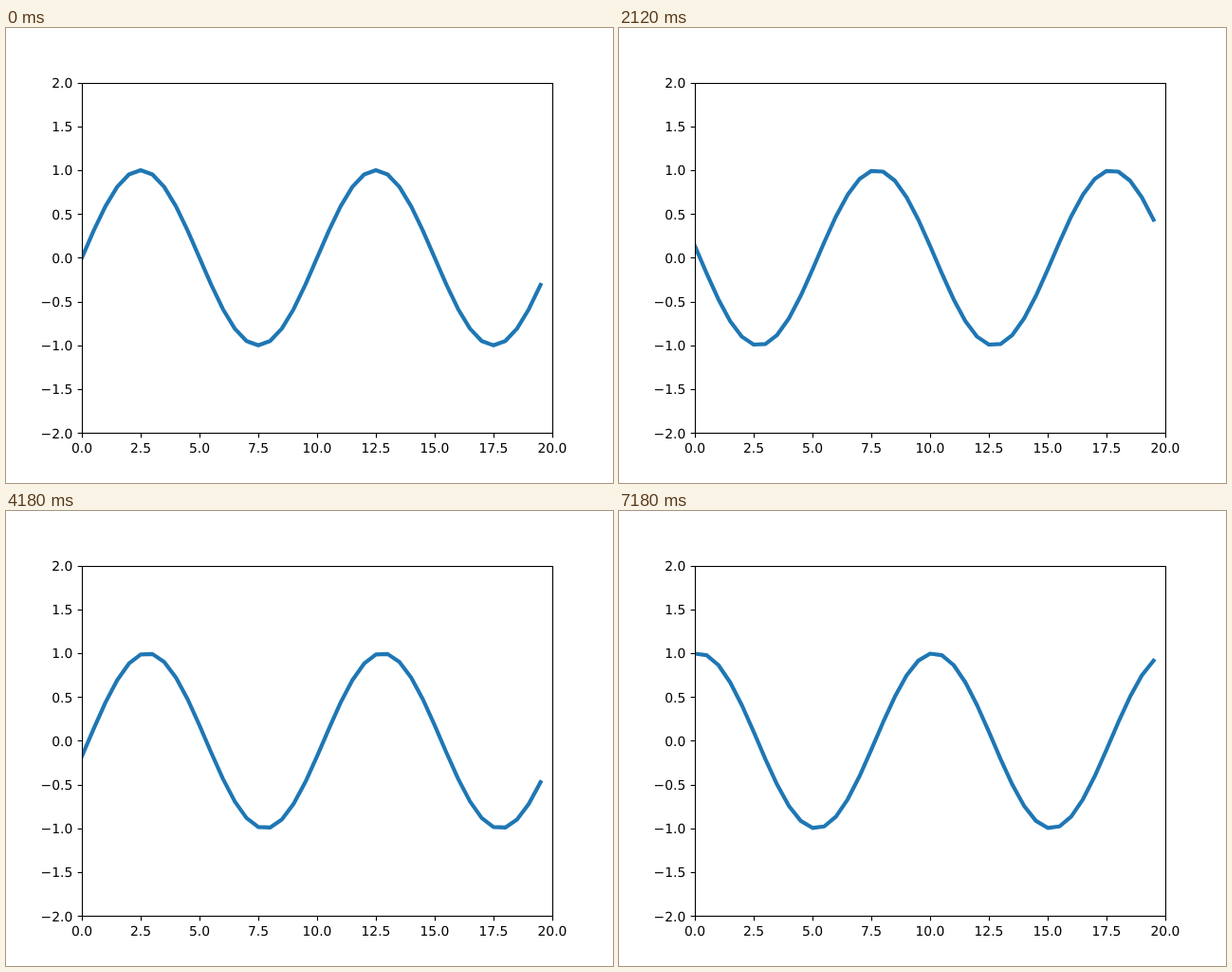
Animation of 640x480 px, one loop 7200 ms. Source, as an HTML page:

```html
<!DOCTYPE html>
<html lang="en">
<head>
<meta charset="utf-8">
<title>Travelling sine wave</title>
<style>
  html, body { margin: 0; width: 100%; height: 100%; overflow: hidden; background: #fff; }
  svg { display: block; }
  text { font: 13.889px "DejaVu Sans", sans-serif; fill: #000; text-rendering: geometricPrecision; }
  .axis { fill: none; stroke: #000; stroke-width: 1.111; }
  #wave { fill: none; stroke: #1f77b4; stroke-width: 4.167; stroke-linejoin: round; stroke-linecap: square; }
</style>
</head>
<body>
<svg width="640" height="480" viewBox="0 0 640 480">
  <clipPath id="plot"><rect x="80" y="57.6" width="496" height="369.6"/></clipPath>
  <g clip-path="url(#plot)"><polyline id="wave"/></g>
  <g id="axes"><rect class="axis" x="80.5" y="58.5" width="496" height="369"/></g>
</svg>
<script>
  const LOOP = 7200, STEP = 20;
  const WAVELENGTH = 10, SHIFT = 0.0492; // shift in x units per step
  const px = x => 80 + x * 24.8;
  const py = y => 242.4 - y * 92.4;
  const snap = v => Math.floor(v + 0.5) + 0.5;

  const axes = document.getElementById('axes');
  const wave = document.getElementById('wave');

  function add(tag, attrs, label = '') {
    const el = document.createElementNS('http://www.w3.org/2000/svg', tag);
    for (const key in attrs) el.setAttribute(key, attrs[key]);
    el.textContent = label;
    axes.append(el);
  }

  for (let x = 0; x <= 20; x += 2.5) {
    add('path', { class: 'axis', d: `M${snap(px(x))} 427.5v4.86` });
    add('text', { x: px(x), y: 448, 'text-anchor': 'middle' }, x.toFixed(1));
  }
  for (let y = -2; y <= 2; y += 0.5) {
    add('path', { class: 'axis', d: `M80.5 ${snap(py(y))}h-4.86` });
    add('text', { x: 70.3, y: Math.round(py(y) + 5.3), 'text-anchor': 'end' },
      y.toFixed(1).replace('-', '\u2212'));
  }

  function draw(ms) {
    const shift = Math.floor((ms % LOOP) / STEP) * SHIFT;
    const points = Array.from({ length: 40 }, (_, i) => {
      const x = i / 2;
      const y = Math.sin(2 * Math.PI * (x - shift) / WAVELENGTH);
      return `${px(x).toFixed(2)},${py(y).toFixed(2)}`;
    });
    wave.setAttribute('points', points.join(' '));
  }

  const start = performance.now();
  function tick() {
    draw(performance.now() - start);
    requestAnimationFrame(tick);
  }
  tick();
</script>
</body>
</html>
```
